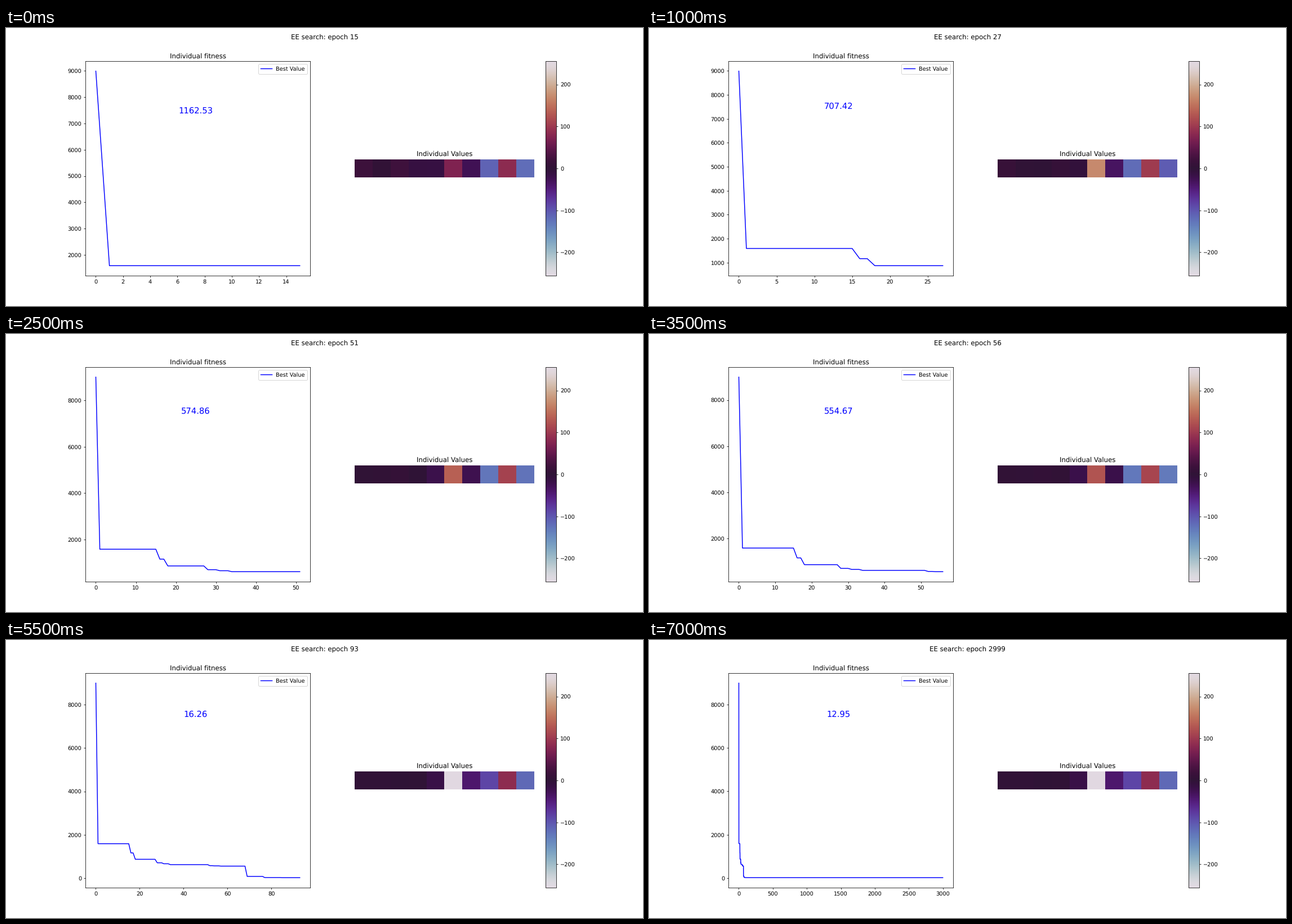
Write a matplotlib script that moves like this. It is 1131 by 495 pixels and loops after 7500 ms.

```python
import numpy as np
import matplotlib.pyplot as plt
from matplotlib.animation import FuncAnimation

WIDTH, HEIGHT = 1131, 495
DPI = WIDTH / 16
FRAMES, FRAME_MS = 15, 500
START_FITNESS, FIRST_BEST = 8992, 1588

# Milestones of the search; everything between them is interpolated.
MILESTONES = [0, 1, 2, 4, 5, 7, 8, 9, 11, 14]
EPOCHS = [15, 17, 27, 33, 51, 56, 68, 76, 93, 2999]
FITNESS = [1162.53, 869.04, 707.42, 621.46, 574.86,
           554.67, 79.52, 26.43, 16.26, 12.95]

# The last five genes drift between four poses.
POSE_STAGES = [0, 2, 6, 8]
POSES = np.array([[72, -27, -112, 84, -121],
                  [170, -35, -120, 102, -106],
                  [125, -20, -131, 112, -132],
                  [253, -42, -87, 85, -117]])

# The first five genes jitter ever less around their resting values.
REST = np.array([3, 3, 3, 3, -17])
JITTER = np.random.default_rng(4).uniform(-18, 18, (9, 5))

plt.rcParams["text.hinting"] = "none"


def geometric(values):
    """Interpolate values on a log scale over all frames."""
    return np.exp(np.interp(range(FRAMES), MILESTONES, np.log(values)))


def fitness_curve(last_epoch):
    """Best fitness known at the start of every epoch."""
    x = np.arange(last_epoch + 1)
    best = np.full(x.size, float(FIRST_BEST))
    best[0] = START_FITNESS
    for epoch, value in zip(epochs, fitness):
        best[x > epoch] = value
    return x, best


def genes(i):
    stage = 8 if i >= 8 else min(i, 6)
    head = REST + JITTER[stage] * 0.8 ** stage
    tail = [np.interp(stage, POSE_STAGES, track) for track in POSES.T]
    return np.concatenate([head, tail])[None, :]


epochs = np.rint(geometric(EPOCHS)).astype(int)
fitness = geometric(FITNESS)

fig, (ax_fit, ax_genes) = plt.subplots(
    1, 2, figsize=(WIDTH / DPI, HEIGHT / DPI), dpi=DPI)
heading = fig.suptitle("")

ax_fit.set_title("Individual fitness")
line, = ax_fit.plot([], [], color="blue", label="Best Value")
ax_fit.legend(loc="upper right")
value_label = ax_fit.annotate(
    "", xy=(0, 0), xytext=(-3.8, 9.4), textcoords="offset points",
    ha="center", va="baseline", fontsize=15, color="blue")

ax_genes.set_title("Individual Values")
ax_genes.axis("off")
strip = ax_genes.imshow(genes(0), cmap="twilight", vmin=-255, vmax=255)
fig.colorbar(strip, ax=ax_genes)


def update(i):
    heading.set_text(f"EE search: epoch {epochs[i]}")
    line.set_data(*fitness_curve(epochs[i]))
    ax_fit.relim()
    ax_fit.autoscale_view()
    value_label.set_text(f"{fitness[i]:.2f}")
    value_label.xy = (epochs[i] / 2, 0.8 * START_FITNESS)
    strip.set_data(genes(i))
    return heading, line, value_label, strip


anim = FuncAnimation(fig, update, frames=FRAMES, interval=FRAME_MS,
                     init_func=lambda: update(0), repeat=True,
                     repeat_delay=0, blit=False)
plt.show()
```
